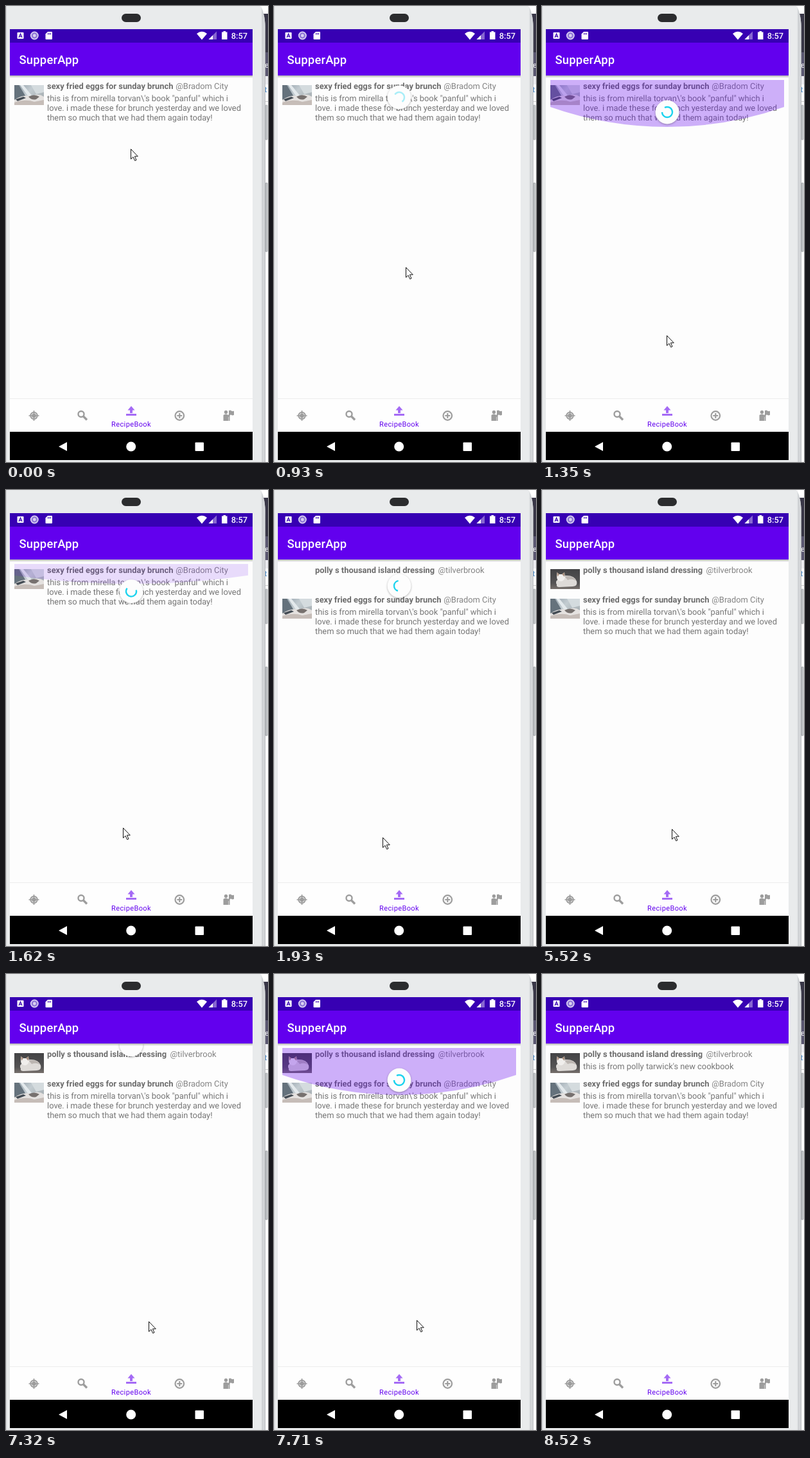
Write an HTML page that moves like this. It is 408 by 709 pixels and loops after 8800 ms.

```html
<!DOCTYPE html>
<html lang="en">
<head>
<meta charset="utf-8">
<title>Pull to refresh</title>
<style>
  html, body { margin: 0; width: 100%; height: 100%; overflow: hidden; background: #fff; }
  svg { display: block; width: 408px; height: 709px; }
  text { font: 12.88px Roboto, "Open Sans", Arial, sans-serif; fill: #757575; text-rendering: geometricPrecision; white-space: pre; }
  .name { font-weight: 700; fill: #6c6c6c; }
  .place { fill: #838383; }
  .bar { font-size: 18.4px; font-weight: 500; letter-spacing: .0125em; fill: #fff; }
  .clock { font-size: 12.9px; font-weight: 500; fill: #fff; }
  .tab { font-size: 11.04px; letter-spacing: .0333em; fill: #6200ee; text-anchor: middle; }
  #disc { filter: drop-shadow(0 1px 1.5px rgba(0, 0, 0, .3)); }
</style>
</head>
<body>
<svg viewBox="0 0 408 709">
  <defs>
    <linearGradient id="edge">
      <stop offset="0" stop-color="#e9ebec"/>
      <stop offset=".45" stop-color="#c6c9cc"/>
      <stop offset=".7" stop-color="#e1e3e5"/>
      <stop offset="1" stop-color="#a9acb0"/>
    </linearGradient>
    <linearGradient id="shade" x2="0" y2="1">
      <stop offset="0" stop-opacity=".3"/>
      <stop offset="1" stop-opacity="0"/>
    </linearGradient>
    <linearGradient id="studio" x2="0" y2="1">
      <stop offset="0" stop-color="#434345"/>
      <stop offset=".7" stop-color="#545354"/>
      <stop offset="1" stop-color="#77706c"/>
    </linearGradient>
    <linearGradient id="room" x2="1" y2=".6">
      <stop offset="0" stop-color="#8e9ba5"/>
      <stop offset=".5" stop-color="#c3ccd1"/>
      <stop offset="1" stop-color="#a9b1b5"/>
    </linearGradient>
    <clipPath id="list"><rect x="6" y="109" width="378" height="501"/></clipPath>
    <clipPath id="thumb"><rect width="46" height="31"/></clipPath>
  </defs>

  <!-- window behind the phone -->
  <rect x="400" width="8" height="709" fill="#fff"/>
  <rect x="400" y="12" width="8" height="60" fill="#393747"/>
  <rect x="400" y="72" width="8" height="37" fill="#5b5871"/>
  <text x="403" y="96" style="font-size:12px;fill:#fff">e</text>
  <rect x="400" y="109" width="8" height="13" fill="#ececf0"/>
  <text x="402.5" y="134" style="font-size:12px;fill:#2d7bc4">t</text>
  <rect x="400" y="148" width="8" height="1" fill="#ccc"/>

  <!-- phone body -->
  <path d="M0 0H396Q404 12 404 40V709H0Z" fill="#e9ebec"/>
  <path d="M397 0Q404 14 404 40V709H397Z" fill="url(#edge)"/>
  <rect x="404" y="154" width="3" height="54" rx="1" fill="#c5c8cb" stroke="#96999c" stroke-width=".6"/>
  <rect x="404" y="275" width="3" height="107" rx="1" fill="#c5c8cb" stroke="#85888b" stroke-width=".6"/>
  <rect width="1" height="709" fill="#d4d7d9"/>
  <rect x="180" y="12" width="30" height="13" rx="6.5" fill="#2b2c2e"/>

  <!-- screen -->
  <rect x="6" y="36" width="378" height="670" fill="#fdfdfd"/>
  <g clip-path="url(#list)">
    <g id="newRow">
      <g id="newThumb" transform="translate(13 123)" clip-path="url(#thumb)">
        <rect width="46" height="31" fill="url(#studio)"/>
        <path d="M10 24Q7 19 12 16Q15 10 25 10Q38 10 41 19Q43 26 35 27L14 28Q9 28 10 24Z" fill="#dedbd8"/>
        <path d="M22 11Q36 9 40 18Q34 14 27 17Z" fill="#bbb5b1"/>
        <path d="M10 5L14 8H18L22 5L23 13Q21 19 16 19Q10 18 10 12Z" fill="#f0eeec"/>
        <path d="M10 5L14 8L11 12ZM22 5L18 8L22 12Z" fill="#a98f7e"/>
      </g>
      <text class="name" x="64" y="129">polly s thousand island dressing</text>
      <text class="place" x="255.5" y="129">@tilverbrook</text>
      <text id="newBody" x="64" y="148.2">this is from polly tarwick's new cookbook</text>
    </g>
    <g id="oldRow">
      <g transform="translate(13 123)" clip-path="url(#thumb)">
        <rect width="46" height="31" fill="url(#room)"/>
        <path d="M0 0H7L18 18L0 25Z" fill="#65727c"/>
        <path d="M9 0H14L27 16L22 18Z" fill="#e3e9ec"/>
        <path d="M26 0H46V11L34 14Z" fill="#d4dbde"/>
        <path d="M0 23Q13 14 27 17Q37 12 46 18V31H0Z" fill="#e5e2e0"/>
        <path d="M22 18Q31 13 39 18L34 22Q27 24 22 18Z" fill="#77716f"/>
        <path d="M0 27Q18 21 31 26L46 23V31H0Z" fill="#c6bdb8"/>
        <path d="M2 22L14 18L18 20L5 25Z" fill="#454d55"/>
      </g>
      <text class="name" x="64" y="129">sexy fried eggs for sunday brunch</text>
      <text class="place" x="264.3" y="129">@Bradom City</text>
      <text x="64" y="148.2">this is from mirella torvan\'s book "panful" which i</text>
      <text x="64" y="163.2">love. i made these for brunch yesterday and we loved</text>
      <text x="64" y="178.2">them so much that we had them again today!</text>
    </g>
    <g transform="translate(13 115)">
      <path id="glow" d="M0 0H364V42A550 550 0 0 1 0 42Z" fill="#6200ee"/>
    </g>
    <g id="spinner">
      <circle id="disc" r="18.4" fill="#fdfdfd"/>
      <path id="arc" fill="none" stroke="#1cd3ee" stroke-width="2.4"/>
    </g>
  </g>

  <!-- status and app bars -->
  <rect x="6" y="108" width="378" height="4" fill="url(#shade)"/>
  <rect x="6" y="36" width="378" height="21" fill="#3700b3"/>
  <rect x="6" y="57" width="378" height="51" fill="#6200ee"/>
  <text class="bar" x="20.5" y="90">SupperApp</text>
  <rect x="17.5" y="41" width="10" height="10" rx="1" fill="#fff"/>
  <path d="M20 49L22.5 43L25 49M21 47.2H24" fill="none" stroke="#3700b3" stroke-width="1.2"/>
  <circle cx="44.3" cy="46" r="5.6" fill="#8f78d6" stroke="#d9d0f2" stroke-width="1.8"/>
  <circle cx="44.3" cy="46" r="2.4" fill="#d9d0f2"/>
  <path d="M65 40H71Q72 40 72 41V51Q72 52 71 52H62.5Q61.5 52 61.5 51V43.5Z" fill="#fff"/>
  <path d="M65.5 42V44.5M67.5 42V44.5M69.5 42V44.5" stroke="#3700b3"/>
  <path d="M297 43Q305 36.5 313 43L305 52.5Z" fill="#fff"/>
  <path d="M328 39.5V52H315.5Z" fill="#fff" opacity=".4"/>
  <path d="M322 45.5V52H315.5Z" fill="#fff"/>
  <path d="M338.5 39H342V40.5H344.5V52H336V40.5H338.5Z" fill="#fff"/>
  <text class="clock" x="350.8" y="51">8:57</text>

  <!-- tabs -->
  <rect x="6" y="610" width="378" height="52" fill="#fefefe"/>
  <rect x="6" y="610" width="378" height="1" fill="#ececec"/>
  <g fill="none" stroke="#9d9d9d">
    <circle cx="43.5" cy="637" r="5.2" stroke-width="2"/>
    <path d="M43.5 629V645M35.5 637H51.5" stroke-width="1.7"/>
    <circle cx="43.5" cy="637" r="3" fill="#9d9d9d"/>
    <circle cx="117" cy="634.5" r="4.5" stroke-width="2.4"/>
    <path d="M120.5 638L126 643.5" stroke-width="3.4"/>
    <circle cx="270.3" cy="637" r="6.8" stroke-width="2.2"/>
    <path d="M270.3 633V641M266.3 637H274.3" stroke-width="2.2"/>
  </g>
  <path d="M195 622L200.5 628.5H197V633H193V628.5H189.5ZM187 634H203V637H187Z" fill="#a56bf5"/>
  <g fill="#9d9d9d">
    <circle cx="342.5" cy="631.5" r="2.7"/>
    <path d="M338.5 636Q342.5 633 346 636L348.5 634V637.5L346.5 639V645H338.5Z"/>
    <path d="M347 629Q350 628 351 629.5Q353 630.5 355 629.5V636Q352 637 350.5 635.5L348.5 636V645H347Z"/>
  </g>
  <text class="tab" x="195" y="653.5">RecipeBook</text>

  <!-- system buttons -->
  <rect x="6" y="662" width="378" height="44" fill="#000"/>
  <path d="M82 685L95 678V692Z" fill="#fff"/>
  <circle cx="194.7" cy="685" r="7.5" fill="#fff"/>
  <rect x="294.5" y="678.5" width="13.5" height="13.5" rx="1" fill="#fff"/>

  <path id="cursor" d="M.5 .5V16L4 12.7L6.7 18.5L9 17.5L6.4 11.8H11.3Z" fill="#fff" stroke="#111"/>
</svg>
<script>
const LOOP = 8800;
const $ = id => document.getElementById(id);

// The screen only refreshes at these times.
const ticks = [0,
  150, 300, 420, 570, 690, 840, 960, 1080,
  1200, 1350, 1470, 1620, 1770, 1930, 2080, 2200,
  2600, 2784, 2968, 3152, 3336, 3520,
  5520, 5670, 5790, 5940, 6060, 6180,
  6750, 6900, 7050, 7170, 7320, 7440, 7590, 7710,
  7860, 7980, 8130, 8250, 8400, 8520];

const mouse = [[0, 194, 222], [570, 210, 345], [1080, 200, 460], [1350, 194, 512],
  [1930, 169, 540], [2080, 167, 556], [2200, 168, 555], [3520, 202, 515],
  [5500, 202, 515], [5520, 202, 527], [6060, 265, 692], [6180, 265, 720],
  [6740, 265, 720], [6750, 214, 250], [7320, 222, 540], [7710, 222, 538],
  [8400, 262, 687], [8520, 262, 720]];
const pull = [[0, 80], [150, 96], [1080, 158], [1350, 165], [1930, 149], [2200, 149],
  [2600, 80], [7170, 80], [7320, 110], [7710, 165], [8130, 149]];
const size = [[1930, 1], [2200, 0], [2600, 0], [2601, 1], [8130, 1], [8400, 0]];
const glow = [[1080, 0], [1350, 1], [1470, .85], [1770, 0],
  [7320, 0], [7710, 1], [7860, .85], [8130, 0]];
// start angle, sweep, opacity
const ring = [[150, 180, 10, .3], [1080, 225, 270, .4], [1200, 232, 290, 1],
  [1350, 240, 300, 1], [1930, 465, 155, 1], [2200, 560, 60, 1],
  [7170, 180, 10, .3], [7590, 225, 270, 1], [7710, 240, 300, 1], [8400, 520, 120, 1]];

function at(keys, t) {
  const i = keys.findIndex(k => k[0] > t);
  if (i < 0) return keys[keys.length - 1].slice(1);
  if (i === 0) return keys[0].slice(1);
  const a = keys[i - 1], b = keys[i];
  const p = (t - a[0]) / (b[0] - a[0]);
  return a.slice(1).map((v, n) => v + (b[n + 1] - v) * p);
}

function arcPath(start, sweep, r) {
  const point = deg => {
    const a = deg * Math.PI / 180;
    return `${r * Math.cos(a)} ${r * Math.sin(a)}`;
  };
  return `M${point(start)}A${r} ${r} 0 ${sweep > 180 ? 1 : 0} 1 ${point(start + sweep)}`;
}

const set = (id, name, value) => $(id).setAttribute(name, value);
const show = (id, on) => set(id, "display", on ? "inline" : "none");

function draw(time) {
  const t = ticks.filter(k => k <= time).pop();
  const added = t >= 1930;
  show("newRow", added);
  show("newThumb", t >= 2784);
  show("newBody", t >= 8250);
  set("oldRow", "transform", `translate(0 ${added ? 46 : 0})`);

  const [x, y] = at(mouse, t);
  set("cursor", "transform", `translate(${Math.round(x)} ${Math.round(y)})`);

  const [g] = at(glow, t);
  set("glow", "transform", `scale(1 ${g})`);
  set("glow", "opacity", .31 * g);

  const [s] = at(size, t), [cy] = at(pull, t);
  show("spinner", s > 0 && cy > 85);
  set("spinner", "transform", `translate(195 ${cy}) scale(${s})`);
  const [start, sweep, alpha] = at(ring, t);
  set("arc", "d", arcPath(start, sweep, 8));
  set("arc", "opacity", alpha);
}

const begin = performance.now();
function frame() {
  draw((performance.now() - begin) % LOOP);
  requestAnimationFrame(frame);
}
draw(0);
requestAnimationFrame(frame);
</script>
</body>
</html>
```
